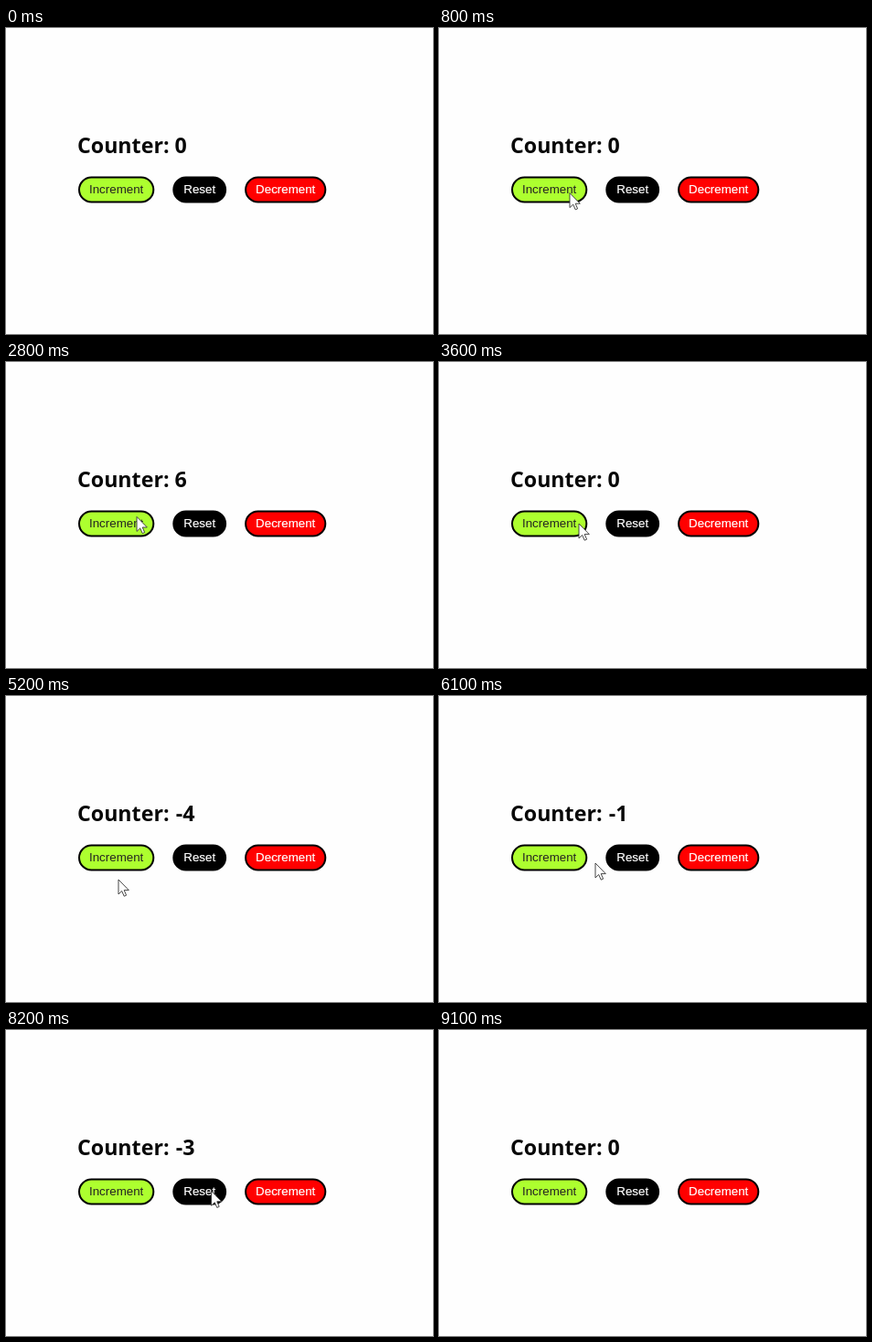
Animation of 467 by 335 pixels, one loop 9600 ms. Source, as an HTML page:

```html
<!DOCTYPE html>
<html lang="en">
<head>
<meta charset="utf-8">
<title>Counter</title>
<style>
  html, body { margin: 0; width: 100%; height: 100%; overflow: hidden; background: #fefefe; }
  svg { display: block; width: 467px; height: 335px; }
  .title { font: bold 23.2px "Open Sans", "Noto Sans", sans-serif; fill: #080808; white-space: pre; }
  .button rect { stroke: #000; stroke-width: 2; }
  .button text { font: 13.333px "Liberation Sans", Arial, sans-serif; fill: #fff; stroke: #fff; stroke-width: .2; }
  .increment rect { fill: #adff2f; }
  .increment text { fill: #222; stroke: none; }
  .decrement rect { fill: #f00; }
</style>
</head>
<body>
<svg viewBox="0 0 467 335">
  <text class="title" x="78" y="137">Counter: <tspan id="sign" dx="1.2"></tspan><tspan id="digit">0</tspan></text>
  <g class="button increment">
    <rect x="80" y="163.5" width="81.3" height="27" rx="13.5"/>
    <text x="91" y="181.4">Increment</text>
  </g>
  <g class="button">
    <rect x="183.3" y="163.5" width="56.8" height="27" rx="13.5"/>
    <text x="194.3" y="181.4">Reset</text>
  </g>
  <g class="button decrement">
    <rect x="262.1" y="163.5" width="87.2" height="27" rx="13.5"/>
    <text x="273.1" y="181.4">Decrement</text>
  </g>
  <path id="cursor" d="M0 0V16L3.7 12.5L6.2 18.2L8.6 17.2L6.2 11.6H11.3Z"
        fill="#fff" stroke="#333" stroke-width=".9" stroke-linejoin="round"/>
</svg>
<script>
const LOOP = 9600, STEP = 100;

// Places the pointer visits
const outside = [226, 340], entry = [226, 268], exit = [320, 340];
const increment = [131, 168], reset = [208, 177], decrement = [314, 172];
const edge = [153, 177], below = [123, 201], gap = [171, 183], beyond = [388, 184];

const moves = [
  { at: 0, lasts: 100, to: entry },
  { at: 100, lasts: 900, to: increment },
  { at: 2700, lasts: 400, to: reset },
  { at: 3300, lasts: 300, to: edge },
  { at: 3900, lasts: 300, to: beyond },
  { at: 4200, lasts: 200, to: decrement },
  { at: 4900, lasts: 300, to: below },
  { at: 5300, lasts: 200, to: increment },
  { at: 5800, lasts: 300, to: gap },
  { at: 6100, lasts: 600, to: decrement },
  { at: 7900, lasts: 400, to: reset },
  { at: 8700, lasts: 400, to: exit }
];

// Runs of clicks; a step of 0 resets the count
const runs = [
  { at: 1200, every: 280, times: 6, step: 1 },
  { at: 3200, step: 0 },
  { at: 4400, every: 130, times: 4, step: -1 },
  { at: 5500, every: 150, times: 3, step: 1 },
  { at: 6400, step: 0 },
  { at: 7200, every: 250, times: 3, step: -1 },
  { at: 8400, step: 0 }
];

const [sign, digit, cursor] = ["sign", "digit", "cursor"].map(id => document.getElementById(id));
const ease = k => k * k * (3 - 2 * k);

function countAt(t) {
  let count = 0;
  for (const { at, every, times, step } of runs) {
    if (t < at) break;
    count = step ? count + step * Math.min(times, 1 + Math.floor((t - at) / every)) : 0;
  }
  return count;
}

function pointAt(t) {
  let point = outside;
  for (const { at, lasts, to } of moves) {
    if (t < at) break;
    const k = ease(Math.min(1, (t - at) / lasts));
    point = point.map((v, i) => v + (to[i] - v) * k);
  }
  return point;
}

function draw(now) {
  const t = Math.floor((now % LOOP) / STEP) * STEP;
  const count = countAt(t);
  sign.textContent = count < 0 ? "-" : "";
  digit.textContent = Math.abs(count);
  cursor.setAttribute("transform", `translate(${pointAt(t)})`);
}

const start = performance.now();
function tick() {
  draw(performance.now() - start);
  requestAnimationFrame(tick);
}
tick();
</script>
</body>
</html>
```
